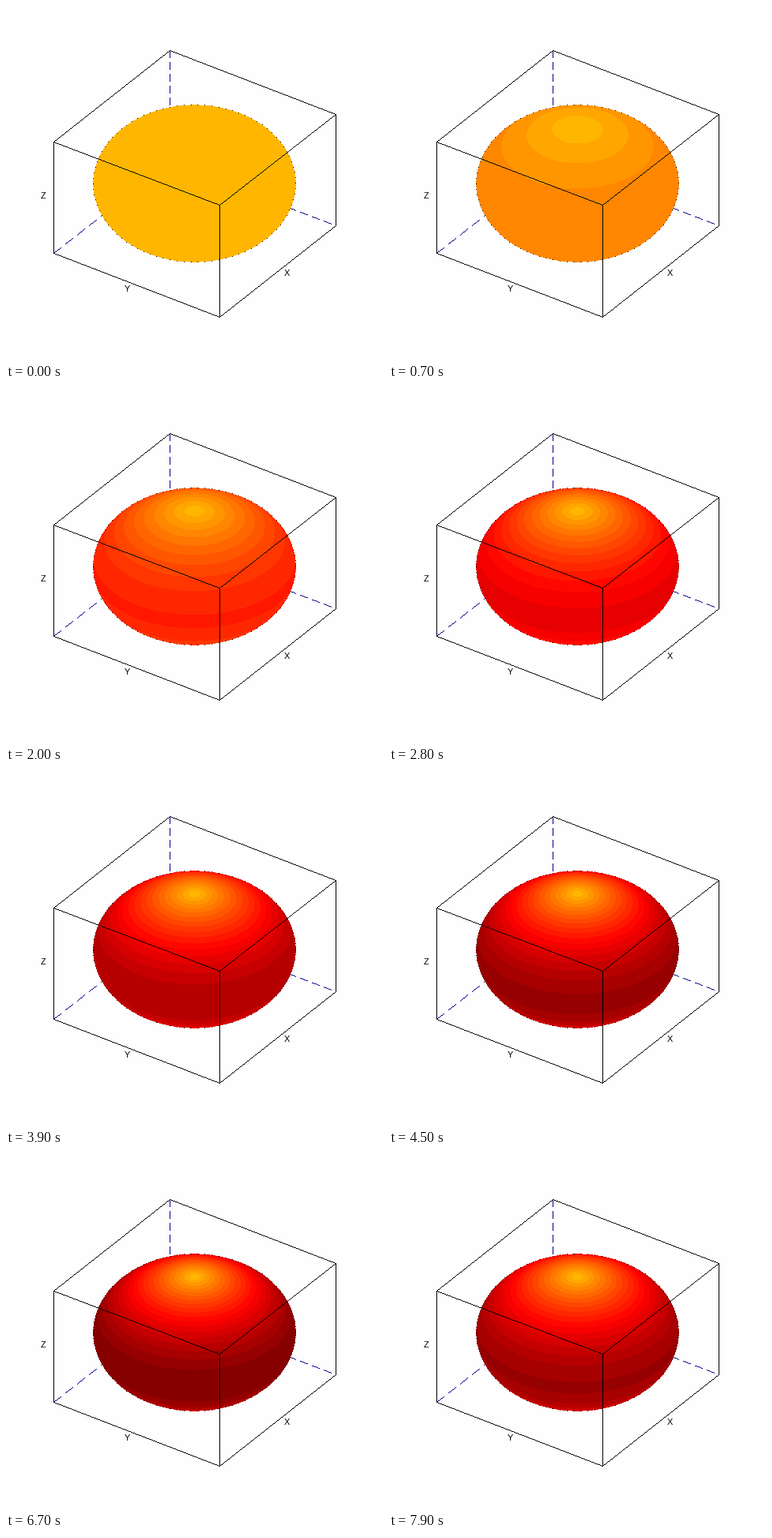
Animation, 477 px wide and 450 px high, one loop 8 s. Source, as a matplotlib script:

```python
import numpy as np
import matplotlib.pyplot as plt
from matplotlib.animation import FuncAnimation

W, H = 477, 450
FRAMES, INTERVAL = 80, 100
LEVELS = 20            # colour steps between pole and equator at full swing
QUARTER = 62.5         # frames in a quarter of the oscillation
PAPER, INK, NAVY = (254, 254, 254), (0, 0, 0), (0, 0, 143)

# Projected half edges of the box (columns x, y, z) and its centre
CENTRE = np.array([238.5, 225.0])
AXES = np.array([[73.5, 105.0, 0.0],
                 [-57.75, 40.25, -70.5]])


def corner(x, y, z):
    return np.round(CENTRE + AXES @ np.array([x, y, z]))


def ellipsoid_field():
    """Mask of the ellipsoid and sine of the polar angle at every pixel."""
    px, py = np.meshgrid(np.arange(W) + 0.5, np.arange(H) + 0.5)
    offset = np.stack([px - CENTRE[0], py - CENTRE[1]], axis=-1)
    base = offset @ np.linalg.pinv(AXES).T
    view = np.cross(AXES[0], AXES[1])
    view = view / np.linalg.norm(view) * np.sign(view[2])
    depth = 1 - (base ** 2).sum(axis=-1)
    nz = base[..., 2] + np.sqrt(np.clip(depth, 0, None)) * view[2]
    return depth >= 0, np.sqrt(np.clip(1 - nz ** 2, 0, 1))


def heat_colours():
    """Orange to red to dark red, in sixteenths of a channel."""
    heat = 182 - np.arange(LEVELS + 1) * 255 / 16
    red = 255 + np.minimum(heat, 0)
    green = np.maximum(heat, 0)
    return np.round(np.stack([red, green, 0 * red], axis=-1)).astype(np.uint8)


def line_pixels(start, end, dash=None):
    """Rows and columns of a line one pixel wide, optionally dashed."""
    p, q = corner(*start), corner(*end)
    steps = int(np.abs(q - p).max())
    k = np.arange(steps + 1)
    if dash:
        on, off = dash
        k = k[k % (on + off) < on]
    points = p + np.outer(k / steps, q - p)
    cols, rows = np.floor(points + 0.5).astype(int).T
    return rows, cols


def rim_pixels(count=90):
    """Sparse dots along the outline of the ellipsoid."""
    phi = np.linspace(0, 2 * np.pi, count, endpoint=False)
    rx, ry = np.linalg.norm(AXES, axis=1)
    tilt = (AXES[0] @ AXES[1]) / (rx * ry)
    x = CENTRE[0] + rx * np.cos(phi)
    y = CENTRE[1] + ry * (tilt * np.cos(phi)
                          + np.sqrt(1 - tilt ** 2) * np.sin(phi))
    return np.floor(y).astype(int), np.floor(x).astype(int)


mask, sine = ellipsoid_field()
sine = sine[mask]
colours = heat_colours()

# Hidden edges meet at the far lower corner
back = (1, -1, -1)
hidden = [((1, -1, 1), back), ((-1, -1, -1), back), (back, (1, 1, -1))]

visible = [((-1, -1, 1), (1, -1, 1)), ((1, -1, 1), (1, 1, 1))]
for z in (1, -1):
    visible += [((-1, -1, z), (-1, 1, z)), ((-1, 1, z), (1, 1, z))]
for x, y in [(-1, -1), (-1, 1), (1, 1)]:
    visible.append(((x, y, 1), (x, y, -1)))

backdrop = np.full((H, W, 3), PAPER, dtype=np.uint8)
for start, end in hidden:
    backdrop[line_pixels(start, end, dash=(10, 5))] = NAVY


def scene(i):
    swing = LEVELS * np.sin(np.pi / 2 * (i + 1) / QUARTER)
    image = backdrop.copy()
    image[mask] = colours[np.floor(swing * sine).astype(int)]
    image[rim_pixels()] = INK
    for start, end in visible:
        image[line_pixels(start, end)] = INK
    return image


fig = plt.figure(figsize=(W / 72, H / 72), dpi=72, facecolor="white")
ax = fig.add_axes([0, 0, 1, 1])
ax.axis("off")
picture = ax.imshow(scene(0), extent=(0, W, H, 0), interpolation="nearest",
                    aspect="auto")
ax.set_xlim(0, W)
ax.set_ylim(H, 0)

for label, x, y in [("X", 355, 338.5), ("Y", 153, 357.5), ("Z", 47.5, 240.5)]:
    ax.text(x, y, label, family="Liberation Sans", size=11, color="black",
            ha="center", va="center_baseline")


def update(i):
    picture.set_data(scene(i))
    return [picture]


anim = FuncAnimation(fig, update, frames=FRAMES, interval=INTERVAL,
                     repeat=True, repeat_delay=0, blit=False)
plt.show()
```
